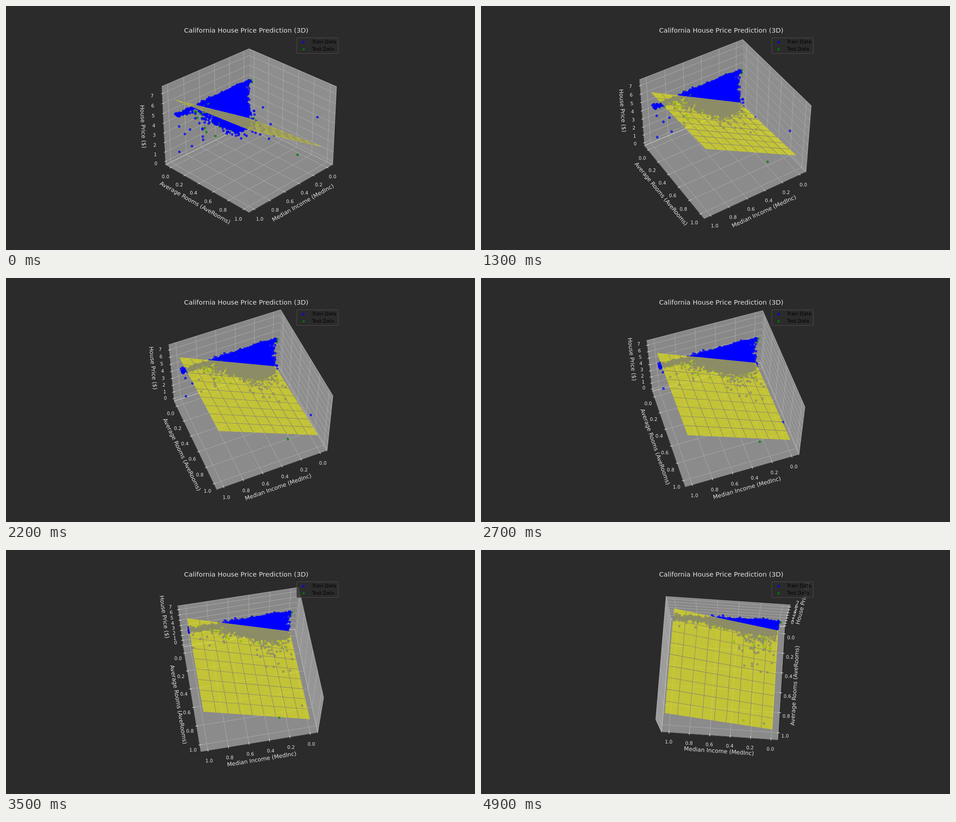
An HTML page with a canvas for the animation above (5 s loop, 1036 by 541 pixels).

```html
<!DOCTYPE html>
<html lang="en">
<head>
<meta charset="utf-8">
<title>House price prediction</title>
<style>
  html, body { margin: 0; width: 100%; height: 100%; overflow: hidden; background: #2b2b2b; }
  canvas { display: block; }
</style>
</head>
<body>
<canvas id="stage" width="1036" height="541"></canvas>
<script>
const ctx = document.getElementById('stage').getContext('2d');
const STEP_MS = 100, STEPS = 50, TEXT = '#e2e2e2';

// Half sizes of the box and the data limits on each axis
const HALF = [0.59524, 0.59524, 0.44643];
const LOW = [-0.0729, -0.0729, -0.363];
const HIGH = [1.0729, 1.0729, 7.703];
const AXES = [
  { label: 'Median Income (MedInc)', ticks: [0, 0.2, 0.4, 0.6, 0.8, 1], digits: 1 },
  { label: 'Average Rooms (AveRooms)', ticks: [0, 0.2, 0.4, 0.6, 0.8, 1], digits: 1 },
  { label: 'House Price ($)', ticks: [0, 1, 2, 3, 4, 5, 6, 7], digits: 0 }
];
const PANES = ['rgba(242,242,242,.5)', 'rgba(230,230,230,.5)', 'rgba(236,236,236,.5)'];

let seed = 7;
function rnd() {
  seed = (seed + 0x6D2B79F5) | 0;
  let t = Math.imul(seed ^ (seed >>> 15), 1 | seed);
  t = (t + Math.imul(t ^ (t >>> 7), 61 | t)) ^ t;
  return ((t ^ (t >>> 14)) >>> 0) / 4294967296;
}
const normal = () => Math.sqrt(-2 * Math.log(1 - rnd())) * Math.cos(2 * Math.PI * rnd());
const clamp = (v, a, b) => Math.min(b, Math.max(a, v));

function house() {
  const income = clamp(3.6 * Math.exp(0.48 * normal()), 0.5, 15);
  let price = 0.4 + 0.42 * income + 0.7 * normal();
  if (rnd() < 0.35) price -= 0.9 * Math.log(1 - rnd());
  if (rnd() < 0.3) {
    const floor = Math.max(0.4, 0.45 * (income - 3));
    price = floor + (5 - floor) * rnd();
  }
  const rooms = clamp(3.7 + 0.4 * income + 1.2 * normal(), 1, 14);
  return [(income - 0.5) / 14.5, (rooms - 0.85) / 141, clamp(price, 0.15, 5)];
}

const train = [], test = [];
for (let i = 0; i < 6500; i++) (i % 7 ? train : test).push(house());
// Homes along the price cap
for (let i = 0; i < 220; i++)
  (i % 12 ? train : test).push([rnd(), 0.035 + 0.012 * normal(), 5]);
for (let i = 0; i < 9; i++) train.push([0.975 + 0.025 * rnd(), 0.03 + 0.02 * rnd(), 4.95]);
// Homes with unusually many rooms
for (let i = 0; i < 80; i++)
  (i % 7 ? train : test).push([
    clamp(0.19 + 0.09 * normal(), 0.03, 0.5),
    0.08 - 0.06 * Math.log(1 - 0.95 * rnd()),
    clamp(1.4 + 0.7 * normal(), 0.5, 4.5)
  ]);
train.push(
  [0.095, 1, 5], [0.08, 0.43, 0.85], [0.145, 0.425, 0.72], [0.045, 0.35, 1.62],
  [0.24, 0.43, 4.42], [0.31, 0.4, 1.9], [0.185, 0.37, 1.5], [0.235, 0.39, 1.4],
  [0.975, 0.03, 1.05], [0.813, 0.03, 1], [0.898, 0.03, 2.62], [0.966, 0.03, 3.67],
  [0.83, 0.03, 2.83], [0.665, 0.03, 1.1], [0.67, 0.03, 1.46], [0.708, 0.03, 3.02],
  [0.67, 0.03, 2.3], [0.675, 0.035, 2.28]
);
test.push([0.285, 0.933, 1.61], [0.02, 0.06, 4.98], [0.92, 0.035, 4.95],
  [0.64, 0.03, 2.25], [0.62, 0.03, 1.75], [0.5, 0.03, 0.85]);

// Camera
let u, v, w;
function aim(azim, elev) {
  const a = azim * Math.PI / 180, e = elev * Math.PI / 180;
  const ca = Math.cos(a), sa = Math.sin(a), ce = Math.cos(e), se = Math.sin(e);
  u = [-sa, ca, 0];
  v = [-se * ca, -se * sa, ce];
  w = [ce * ca, ce * sa, se];
}
const dot = (a, b) => a[0] * b[0] + a[1] * b[1] + a[2] * b[2];
// Box coordinates run from -1 to 1 on every axis
function project(p) {
  const q = [p[0] * HALF[0], p[1] * HALF[1], p[2] * HALF[2]];
  const scale = 2245 / (10 - dot(w, q));
  return [536.8 + scale * dot(u, q), 267.4 - scale * dot(v, q)];
}
const norm = (value, i) => 2 * (value - LOW[i]) / (HIGH[i] - LOW[i]) - 1;
const place = d => project(d.map(norm));

function path(points) {
  ctx.beginPath();
  points.forEach(p => ctx.lineTo(p[0], p[1]));
}
function stroke(points, color, width) {
  path(points);
  ctx.strokeStyle = color;
  ctx.lineWidth = width;
  ctx.stroke();
}
function write(text, x, y, size, color = TEXT, align = 'center') {
  ctx.font = size + 'px "DejaVu Sans", sans-serif';
  ctx.fillStyle = color;
  ctx.textAlign = align;
  ctx.fillText(text, x, y);
}

function marker(color) {
  const c = document.createElement('canvas');
  c.width = c.height = 32;
  const g = c.getContext('2d');
  g.scale(4, 4);
  g.globalAlpha = 0.7;
  g.fillStyle = g.strokeStyle = color;
  g.arc(4, 4, 2.35, 0, 7);
  g.fill();
  g.stroke();
  return c;
}
const blue = marker('#00f'), green = marker('#008000');
const stamp = (image, [x, y]) => ctx.drawImage(image, x - 4, y - 4, 8, 8);

// The outline stays open: the last side of each pane has no edge
function drawPane(i, back) {
  const [j, k] = [0, 1, 2].filter(n => n !== i);
  path([[-1, -1], [1, -1], [1, 1], [-1, 1]].map(([a, b]) => {
    const p = [];
    p[i] = back[i]; p[j] = a; p[k] = b;
    return project(p);
  }));
  ctx.fillStyle = ctx.strokeStyle = PANES[i];
  ctx.lineWidth = 1.04;
  ctx.fill();
  ctx.stroke();
}

function drawAxis(i, back, side) {
  const { label, ticks, digits } = AXES[i];
  const j = (i + 1) % 3, k = (i + 2) % 3;
  const edge = [[0, 1, -1], [side, 0, -1], [side, -1, 0]][i];
  const tickAxis = i ? 0 : 1;
  const at = (value, spread) => project(edge.map((e, n) => n === i ? value : e * spread));
  const start = at(-1, 1), end = at(1, 1);
  stroke([start, end], '#000', 0.83);

  for (const t of ticks) {
    const pos = norm(t, i);
    const grid = [[-1, 1], [1, 1], [1, -1]].map(([a, b]) => {
      const p = [];
      p[i] = pos; p[j] = back[j] * a; p[k] = back[k] * b;
      return project(p);
    });
    stroke(grid, '#b0b0b0', 0.83);
  }
  for (const t of ticks) {
    const pos = norm(t, i);
    stroke([1.016, 0.968].map(f => {
      const p = edge.slice();
      p[i] = pos;
      p[tickAxis] *= f;
      return project(p);
    }), '#fff', 0.9);
    const [x, y] = at(pos, 1 + 1.92 * 0.05778);
    write(t.toFixed(digits), x, y + 8.6, 10.45);
  }

  let angle = Math.atan2(end[1] - start[1], end[0] - start[0]);
  if (angle >= Math.PI / 2) angle -= Math.PI;
  if (angle < -Math.PI / 2) angle += Math.PI;
  ctx.save();
  ctx.translate(...at(0, 1 + 1.92 * 0.12563));
  ctx.rotate(angle);
  write(label, 0, 3.6, 12.58);
  ctx.restore();
}

function drawPlane() {
  const at = (x, y) => place([x, y, 0.79 + 5.65 * x + 0.75 * y]);
  path([at(0, 0), at(1, 0), at(1, 1), at(0, 1)]);
  ctx.fillStyle = 'rgba(234,234,0,.6)';
  ctx.fill();
  for (let n = 1; n < 9; n++) {
    stroke([at(n / 9, 0), at(n / 9, 1)], '#8b8a68', 1.1);
    stroke([at(0, n / 9), at(1, n / 9)], '#8b8a68', 1.1);
  }
}

function drawLegend() {
  ctx.beginPath();
  ctx.roundRect(642.3, 70.5, 91.6, 34.8, 2.5);
  ctx.fillStyle = 'rgba(43,43,43,.8)';
  ctx.strokeStyle = '#4c4c4c';
  ctx.lineWidth = 1.04;
  ctx.fill();
  ctx.stroke();
  stamp(blue, [657.3, 80.3]);
  stamp(green, [657.3, 96]);
  write('Train Data', 676, 83, 10.45, '#000', 'left');
  write('Test Data', 676, 98.7, 10.45, '#000', 'left');
}

function draw(step) {
  aim(45 + step, 30 + step);
  const side = step > 45 ? -1 : 1;
  const back = [-side, -1, -1];
  ctx.fillStyle = '#2b2b2b';
  ctx.fillRect(0, 0, 1036, 541);
  for (let i = 0; i < 3; i++) drawPane(i, back);
  for (let i = 0; i < 3; i++) drawAxis(i, back, side);
  test.forEach(d => stamp(green, place(d)));
  train.forEach(d => stamp(blue, place(d)));
  drawPlane();
  write('California House Price Prediction (3D)', 530.6, 59, 14.67);
  drawLegend();
}

let shown = -1;
const origin = performance.now();
function tick() {
  const step = Math.floor((performance.now() - origin) / STEP_MS) % STEPS;
  if (step !== shown) draw(shown = step);
  requestAnimationFrame(tick);
}
tick();
</script>
</body>
</html>
```
